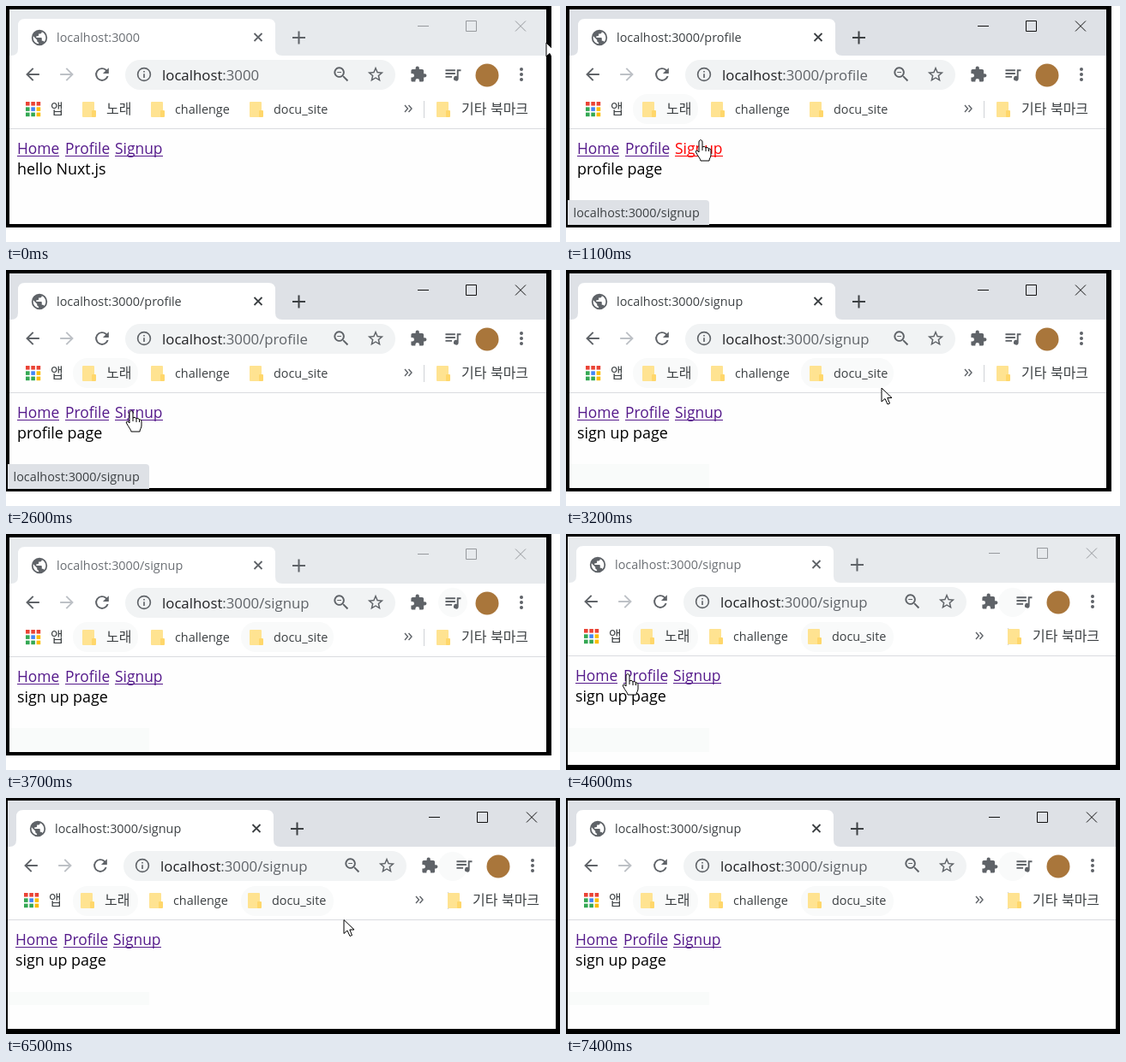
Write an HTML page that moves like this. It is 646 px wide and 276 px high and loops after 7500 ms.

```html
<!DOCTYPE html>
<html lang="ko">
<head>
<meta charset="utf-8">
<title>Browser navigation</title>
<style>
html, body { margin: 0; width: 100%; height: 100%; overflow: hidden; background: #fff; }
svg { display: block; width: 646px; height: 276px; }
text { font: 14.4px "Open Sans", "Noto Sans CJK KR", "Noto Sans CJK", sans-serif; fill: #3c4043; white-space: pre; }
.ko { font: 16px "Noto Sans CJK KR", "Noto Sans CJK", sans-serif; }
.url { font-size: 16.8px; fill: #202124; }
.link { font-size: 17.4px; }
.body { font-size: 17.9px; fill: #000; }
</style>
</head>
<body>
<svg id="stage" viewBox="0 0 646 276"></svg>
<script>
const LOOP = 7500, STEP = 100, GREY = '#5f6368';
const stage = document.getElementById('stage');

// Material-style 24px glyphs
const glyph = {
  back: 'M20 11H7.83l5.59-5.59L12 4l-8 8 8 8 1.41-1.41L7.83 13H20z',
  reload: 'M17.65 6.35A8 8 0 1 0 19.73 14h-2.08A6 6 0 1 1 12 6c1.66 0 3.14.69 4.22 1.78L13 11h7V4z',
  globe: 'M12 2a10 10 0 1 0 0 20 10 10 0 0 0 0-20zm-1 17.93c-3.95-.49-7-3.85-7-7.93 0-.62.08-1.21.21-1.79L9 15v1c0 1.1.9 2 2 2zm6.9-2.54c-.26-.81-1-1.39-1.9-1.39h-1v-3c0-.55-.45-1-1-1H8v-2h2c.55 0 1-.45 1-1V7h2c1.1 0 2-.9 2-2v-.41c2.93 1.19 5 4.06 5 7.41 0 2.08-.8 3.97-2.1 5.39z',
  info: 'M11 7h2v2h-2zm0 4h2v6h-2zm1-9a10 10 0 1 0 0 20 10 10 0 0 0 0-20zm0 18a8 8 0 1 1 0-16 8 8 0 0 1 0 16z',
  zoom: 'M15.5 14h-.79l-.28-.27A6.5 6.5 0 1 0 13.73 14.43l.27.28v.79l5 4.99L20.49 19zm-6 0a4.5 4.5 0 1 1 0-9 4.5 4.5 0 0 1 0 9zM7 9h5v1H7z',
  star: 'M22 9.24l-7.19-.62L12 2 9.19 8.63 2 9.24l5.46 4.73L5.82 21 12 17.27 18.18 21l-1.63-7.03zM12 15.4l-3.76 2.27 1-4.28-3.32-2.88 4.38-.38L12 6.1l1.71 4.04 4.38.38-3.32 2.88 1 4.28z',
  puzzle: 'M20.5 11H19V7c0-1.1-.9-2-2-2h-4V3.5a2.5 2.5 0 0 0-5 0V5H4c-1.1 0-2 .9-2 2v3.8h1.5a2.7 2.7 0 0 1 0 5.4H2V20c0 1.1.9 2 2 2h3.8v-1.5a2.7 2.7 0 0 1 5.4 0V22H17c1.1 0 2-.9 2-2v-4h1.5a2.5 2.5 0 0 0 0-5z',
  queue: 'M15 6H3v2h12zm0 4H3v2h12zM3 16h8v-2H3zM17 6v8.18A3 3 0 1 0 19 17V8h3V6z'
};

// Timelines: [start, value]
const pages = [[0, ''], [800, 'profile'], [1600, 'signup'], [2300, 'profile'], [2800, 'signup'], [4700, 'profile'], [6000, 'signup']];
const hints = [[0, ''], [800, 'profile'], [1000, 'signup'], [2100, 'profile'], [2500, 'signup'], [3100, ''], [4800, 'profile'], [5200, 'signup'], [6500, '']];
const focus = [[0, 0], [800, 1], [3600, 0], [4700, 1], [6800, 0], [7400, 1]];
const path = [
  [0, 630, 43], [400, 125, 118], [600, 79, 166], [800, 79, 166], [1100, 157, 157], [1300, 146, 165],
  [2000, 146, 165], [2200, 95, 165], [2400, 95, 165], [2600, 146, 165], [2800, 146, 165],
  [3000, 240, 149], [3200, 368, 138], [3300, 420, 97], [3500, 594, 92], [3600, 700, 90], [3700, 700, 90],
  [3800, 636, 110], [4200, 72, 164], [5000, 72, 164], [5200, 150, 163], [5500, 169, 190],
  [5700, 238, 140], [5900, 150, 165], [6300, 150, 165], [6700, 638, 120], [6800, 700, 120], [7500, 700, 120]
];
const text = { '': 'hello Nuxt.js', profile: 'profile page', signup: 'sign up page' };
const links = [['Home', 13, 62], ['Profile', 69, 120], ['Signup', 127, 183]];

const at = (list, t) => list.filter(k => k[0] <= t).pop()[1];

function pointer(t) {
  const i = path.findIndex(k => k[0] > t), [t0, x0, y0] = path[i - 1], [t1, x1, y1] = path[i];
  const p = (t - t0) / (t1 - t0);
  return [x0 + (x1 - x0) * p, y0 + (y1 - y0) * p];
}

const rect = (x, y, w, h, fill, r = 0) => `<rect x="${x}" y="${y}" width="${w}" height="${h}" rx="${r}" fill="${fill}"/>`;
const disc = (x, y, r, fill) => `<circle cx="${x}" cy="${y}" r="${r}" fill="${fill}"/>`;
const line = (d, color, w = 1) => `<path d="${d}" fill="none" stroke="${color}" stroke-width="${w}"/>`;
const label = (x, y, s, cls = '', style = '') => `<text x="${x}" y="${y}" class="${cls}" style="${style}">${s}</text>`;
const move = (x, y, s) => `<g transform="translate(${x} ${y})">${s}</g>`;
const icon = (name, x, y, s = .86, fill = GREY, flip = 1) =>
  `<path transform="translate(${x} ${y}) scale(${s * flip} ${s}) translate(-12 -12)" d="${glyph[name]}" fill="${fill}"/>`;
const folder = x => rect(x, 112, 14, 18, '#ffe391', 1) + rect(x + 11, 122, 5, 8, '#ffd76b', 1);

function apps() {
  const [r, g, b, y] = ['#ea4335', '#34a853', '#4285f4', '#fbbc04'];
  return [r, r, r, g, b, y, g, g, y].map((c, i) => rect(23 + i % 3 * 6.3, 112 + (i / 3 | 0) * 6.3, 4.6, 4.6, c)).join('');
}

function leftSide(page, active, red) {
  const url = page && '/' + page, ink = active ? '#3c4043' : '#6b6f74';
  return `<path d="M6 58q8 0 8-8V23q0-8 8-8H306q8 0 8 8V50q0 8 8 8z" fill="#fff"/>`
    + icon('globe', 39, 37, .92) + label(59, 42, 'localhost:3000' + url, '', 'fill:' + ink)
    + line('M289.5 32l9 9m0-9l-9 9', active ? '#3c4043' : GREY, 1.8)
    + line('M334 37h15M341.500 29.500v15', active ? '#3c4043' : GREY, 2)
    + icon('back', 31, 80, .98) + icon('back', 71, 80, .98, '#bdc1c6', -1) + icon('reload', 112, 80, .98)
    + icon('info', 161, 80, .82)
    + label(182, 87, `localhost<tspan fill="${GREY}">:3000${url}</tspan>`, 'url')
    + apps() + label(52, 126, '앱', 'ko') + folder(89) + label(117, 126, '노래', 'ko')
    + folder(169) + label(197, 126, 'challenge') + folder(284) + label(312, 126, 'docu_site')
    + links.map(([name, x, end], i) => {
      const c = red && i === 2 ? '#f00' : '#551a8b';
      return label(x, 173, name, 'link', 'fill:' + c) + rect(x, 175, end - x, 1, c);
    }).join('')
    + label(13, 197, text[page], 'body');
}

function rightSide(active, wide) {
  const c = active ? '#111' : '#96999d', bar = wide ? 502 : 487;
  return line('M480 23.500h13M536.500 17.500h12v12h-12zM594 17.500l12 12m0-12l-12 12', c)
    + icon('zoom', 391, 80, .96) + icon('star', 431, 80, .92) + icon('puzzle', 481, 80)
    + icon('queue', 521, 80, .95) + disc(561, 81, 13.5, '#a9763b')
    + [74, 80, 86].map(y => disc(601, y, 2, GREY)).join('')
    + line('M465 116l3.500 4-3.500 4M469.500 116l3.500 4-3.500 4', GREY, 1.4)
    + rect(bar, 111, 1, 20, '#d0d3d7') + folder(502) + label(531, 126, '기타 북마크', 'ko');
}

function cursor(x, y, wide) {
  const ox = wide ? 2 : 0;
  const hand = y >= 156 && y <= 177 && links.some(l => x >= l[1] - ox && x <= l[2] - ox);
  const d = hand
    ? 'M-2 2C-2-1 2-1 2 2V8C3 7 5.500 7 6 9C7 8 9 8.500 9.500 10C11 9.500 12 10.500 12 12V17C12 20 10 21 10 24H0C0 22-3 19-5.500 14C-6.500 12-4 11-2 14ZM2 8v4M6 9v4M9.500 10v3'
    : 'M0 0V16L4 12.500L7 19L9.500 18L6.800 11.500H12Z';
  return move(x, y, `<path d="${d}" fill="#fff" stroke="#000" stroke-linejoin="round"/>`);
}

function draw(t) {
  const wide = t >= 3800, active = at(focus, t), hint = at(hints, t);
  const [x, y, r, b] = wide ? [2, 3, 641, 270] : [4, 4, 630, 255];
  const dx = wide ? -2 : 0, dy = wide ? -1 : 0, rx = wide ? 13 : 0;
  const pillX = 139 + dx;
  let s = rect(0, 0, 646, 276, '#000')
    + rect(x, y, r - x, b - y, '#fefefe')
    + rect(x, y, r - x, 54, active ? '#dee1e6' : '#e7eaed')
    + rect(x, y + 54, r - x, 85, '#fff')
    + rect(x, y + 139, r - x, 1, '#dadce0')
    + rect(pillX, 63 + dy, 454 + rx - pillX, 35, '#f1f3f4', 17.5);
  // soft hover pills left behind by the pointer
  if (t >= 400) s += rect(78, 103, 76, 35, '#f9fafa', 17);
  if (t >= 3200) s += rect(274, 103, 108, 35, '#f9fafa', 17);
  if (t >= 3400) s += disc(521, 80, 17, '#f9fafa');
  if (t >= 3100) s += rect(x, 227, 167 - x, t >= 6500 ? 15 : 28, '#f9fbfa');
  s += move(dx, dy, leftSide(at(pages, t), active, t >= 1100 && t < 1300))
    + move(rx, dy, rightSide(active, wide));
  if (hint) s += move(dx, wide ? 15 : 0,
    '<path d="M2 227H163q4 0 4 4V256H2z" fill="#dee1e6"/>' + label(8.5, 247, 'localhost:3000/' + hint));
  s += cursor(...pointer(t), wide);
  if (!wide) s += rect(636, 0, 10, 276, '#fff') + rect(0, 259, 646, 17, '#fff');
  stage.innerHTML = s;
}

let last = -1;
const start = performance.now();
function tick() {
  const t = Math.floor((performance.now() - start) % LOOP / STEP) * STEP;
  if (t !== last) draw(last = t);
  requestAnimationFrame(tick);
}
tick();
</script>
</body>
</html>
```
